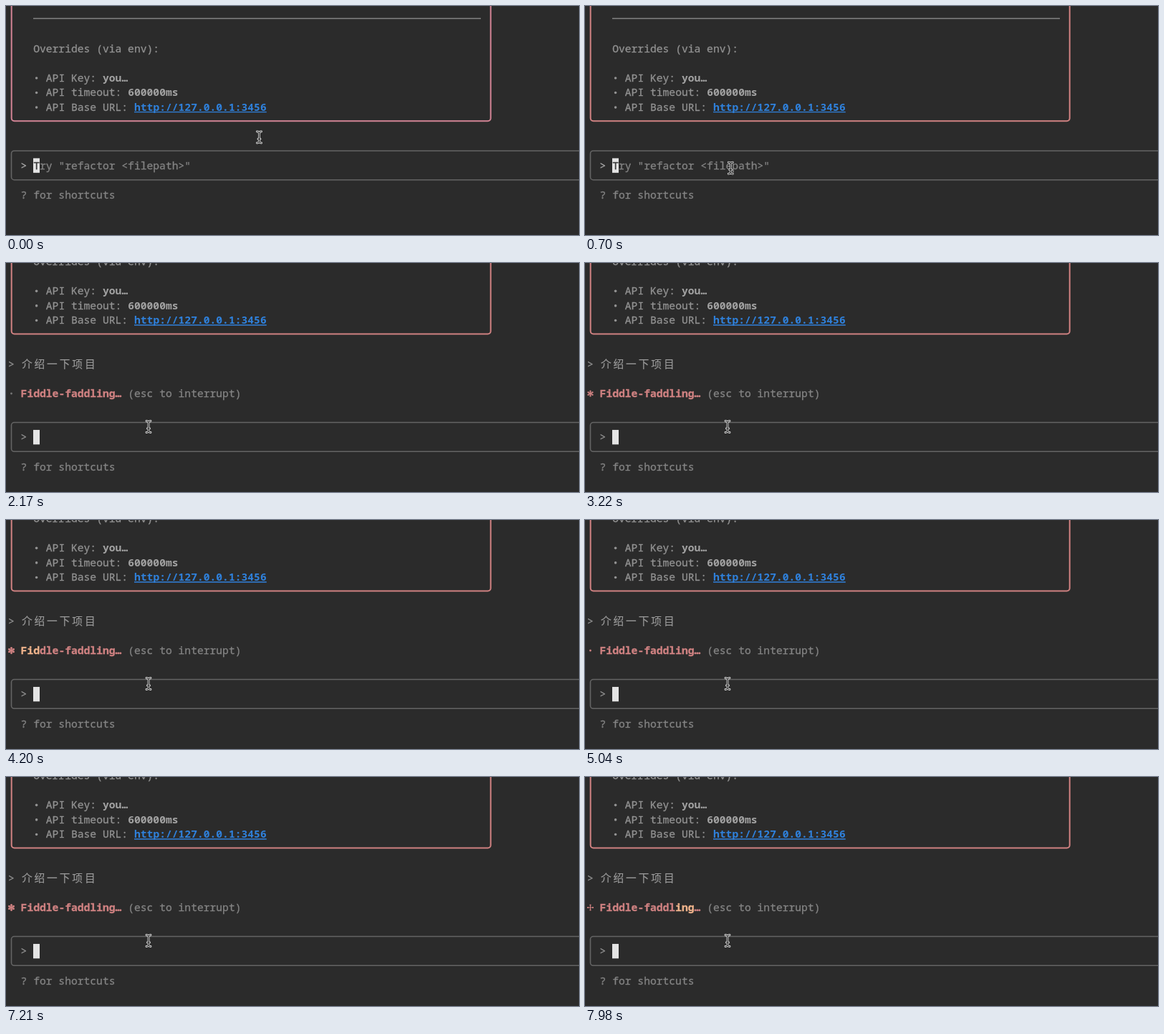
Write an HTML page that moves like this. It is 800 px wide and 321 px high and loops after 8 s.

```html
<!DOCTYPE html>
<html lang="en">
<head>
<meta charset="utf-8">
<title>Terminal session</title>
<style>
  html, body { margin: 0; width: 100%; height: 100%; overflow: hidden; background: #2b2b2b; }
  svg { display: block; width: 100vw; height: 100vh; }
  text, tspan { fill: currentColor; stroke: currentColor; stroke-width: .3px; }
  text { font: 14.667px "Noto Sans Mono", "DejaVu Sans Mono", monospace; white-space: pre; }
  .cjk { font-family: "Noto Sans CJK SC", "Noto Sans CJK", sans-serif; stroke-width: .15px; }
  .semi, .semi tspan { font-weight: 600; }
  .bold { font-weight: 700; stroke: none; }
</style>
</head>
<body>
<svg id="stage" viewBox="0 0 800 321" preserveAspectRatio="xMinYMin meet"></svg>
<script>
const LOOP = 8000, COL = 8.8, ROW = 20.55, LEFT = 3;
const TYPED = 1050, SENT = 2100;
const GREY = '#929292', DIM = '#848484', SALMON = '#d08282', GLOW = '#f0b48c', LINK = '#2f81dc';
const PROMPT = '介绍一下项目', STATUS = 'Fiddle-faddling…';
const stage = document.getElementById('stage');

function add(parent, tag, attrs = {}, content = '') {
  const node = document.createElementNS('http://www.w3.org/2000/svg', tag);
  for (const key in attrs) node.setAttribute(key, attrs[key]);
  node.textContent = content;
  parent.append(node);
  return node;
}
const colX = col => LEFT + col * COL;
const write = (parent, col, y, content, color = GREY, cls = '') =>
  add(parent, 'text', { x: colX(col), y: y + 5.2, color, class: cls }, content);
// Wide characters take two columns each.
const writeWide = (parent, col, y, content, color) =>
  add(parent, 'text', {
    x: [...content].map((_, i) => colX(col + 2 * i) + 1.3).join(' '),
    y: y + 5.4, color, class: 'cjk'
  }, content);
const show = (node, visible) => node.setAttribute('display', visible ? 'inline' : 'none');

add(stage, 'rect', { width: 800, height: 321, fill: '#2b2b2b' });

// Settings panel
const panel = add(stage, 'g');
const frame = add(panel, 'rect', {
  x: 7.7, y: -100, width: 669, height: 261.2, rx: 4, fill: 'none', 'stroke-width': 2
});
add(panel, 'path', { d: 'M38 17.5H663', stroke: '#858585', 'stroke-width': 1.5 });
write(panel, 4, 59.4, 'Overrides (via env):');
[
  ['API Key:', 'you…'],
  ['API timeout:', '600000ms'],
  ['API Base URL:', 'http://127.0.0.1:3456']
].forEach(([label, value], i) => {
  const y = 100.5 + i * ROW, col = 7 + label.length, link = i === 2;
  add(panel, 'circle', { cx: colX(4.5), cy: y + .5, r: 1.8, fill: GREY });
  write(panel, 6, y, label);
  write(panel, col, y, value, link ? LINK : '#a2a2a2', 'bold');
  if (link) add(panel, 'path', {
    d: `M${colX(col)} ${y + 7}H${colX(col + value.length)}`, stroke: LINK, 'stroke-width': 1.4
  });
});

// Sent message and its progress line
const reply = add(stage, 'g');
write(reply, 0, 141.7, '>');
writeWide(reply, 2, 141.7, PROMPT, '#9a9a9a');
const status = write(reply, 2, 182.8, '', SALMON, 'semi');
const letters = [...STATUS].map(ch => add(status, 'tspan', {}, ch));
write(reply, 19, 182.8, '(esc to interrupt)', DIM);
const spinner = add(reply, 'g', { transform: 'translate(7.5 183)' });

function star(arms, radius, width, tips) {
  const g = add(spinner, 'g', { 'stroke-width': width, 'stroke-linecap': 'round' });
  for (let i = 0; i < arms; i++) {
    const a = i / arms * 2 * Math.PI - Math.PI / 2;
    const x = radius * Math.cos(a), y = radius * Math.sin(a);
    add(g, 'path', { d: `M0 0L${x} ${y}` });
    if (tips) add(g, 'circle', { cx: x, cy: y, r: tips, stroke: 'none' });
  }
  return g;
}
const glyphs = [
  add(spinner, 'circle', { r: 1.4, stroke: 'none' }),
  star(4, 3.5, 1.1, 1.1),
  star(6, 3.6, 1.1, 0),
  star(6, 3.8, 1.6, 0),
  star(6, 3.5, 1.5, 1.1),
  star(6, 3.5, 1.8, 1.4)
];

// Input box
const input = add(stage, 'g');
add(input, 'rect', {
  x: 7.5, y: 203, width: 820, height: 40.7, rx: 4, fill: 'none', stroke: '#646464', 'stroke-width': 1.6
});
const chevron = write(input, 2, 223.6, '>');
const cursor = add(input, 'rect', { y: 213.4, width: 9, height: 20.4, fill: '#e4e4e4' });
const hint = add(input, 'g');
write(hint, 4, 223.6, 'T', '#3a3a3a');
write(hint, 5, 223.6, 'ry "refactor <filepath>"', DIM);
const typed = writeWide(input, 4, 223.6, PROMPT, '#b4b8be');
const help = write(input, 2, 264.8, '? for shortcuts', DIM);

// Text pointer
const pointer = add(stage, 'g', { fill: 'none', 'stroke-linecap': 'round' });
const beam = 'M-3-8Q-1-8 0-6.5Q1-8 3-8M0-6.5V6.5M-3 8Q-1 8 0 6.5Q1 8 3 8M-1.5 2.5H1.5';
add(pointer, 'path', { d: beam, stroke: '#e8e8e8', 'stroke-width': 2.8 });
add(pointer, 'path', { d: beam, stroke: '#202020', 'stroke-width': 1.2 });

const ease = (t, from, to) => {
  const p = Math.min(1, Math.max(0, (t - from) / (to - from)));
  return p * p * (3 - 2 * p);
};

function drawStatus(t) {
  // The spinner stalls once, then runs on the same clock.
  const clock = t > 2980 && t < 3710 ? 2980 : t;
  const phase = Math.floor((clock - 2088) / 120) % 12;
  const current = phase < 6 ? phase : 11 - phase;
  glyphs.forEach((glyph, i) => show(glyph, i === current));
  const color = t < 2240 ? '#777' : SALMON;
  spinner.setAttribute('fill', color);
  spinner.setAttribute('stroke', color);

  const start = t < 3710 ? 2300 : 4110;
  const center = t < start - 50 ? -9 : Math.floor(((t - start + 50) % 1600) / 50) - 1;
  letters.forEach((letter, i) =>
    letter.setAttribute('color', Math.abs(i - center) <= 1 ? GLOW : SALMON));
}

function draw(t) {
  const sent = t >= SENT, entered = t >= TYPED && !sent;
  panel.setAttribute('transform', `translate(0 ${sent ? -3 * ROW : 0})`);
  input.setAttribute('transform', `translate(0 ${sent ? ROW : 0})`);
  frame.setAttribute('stroke', t < 70 ? '#d28495' : SALMON);
  chevron.setAttribute('color', sent ? GREY : '#aaa');
  cursor.setAttribute('x', colX(entered ? 16 : 4) - .2);
  show(reply, sent);
  show(hint, t < TYPED);
  show(typed, entered);
  show(help, !entered);
  if (sent) drawStatus(t);

  const move = ease(t, 70, 490), nudge = ease(t, 690, 770);
  pointer.setAttribute('transform',
    `translate(${353.5 - 150 * move - 4.5 * nudge} ${184 + 43 * move + 2.5 * nudge})`);
}

const begin = performance.now();
function tick() {
  draw((performance.now() - begin) % LOOP);
  requestAnimationFrame(tick);
}
draw(0);
requestAnimationFrame(tick);
</script>
</body>
</html>
```
